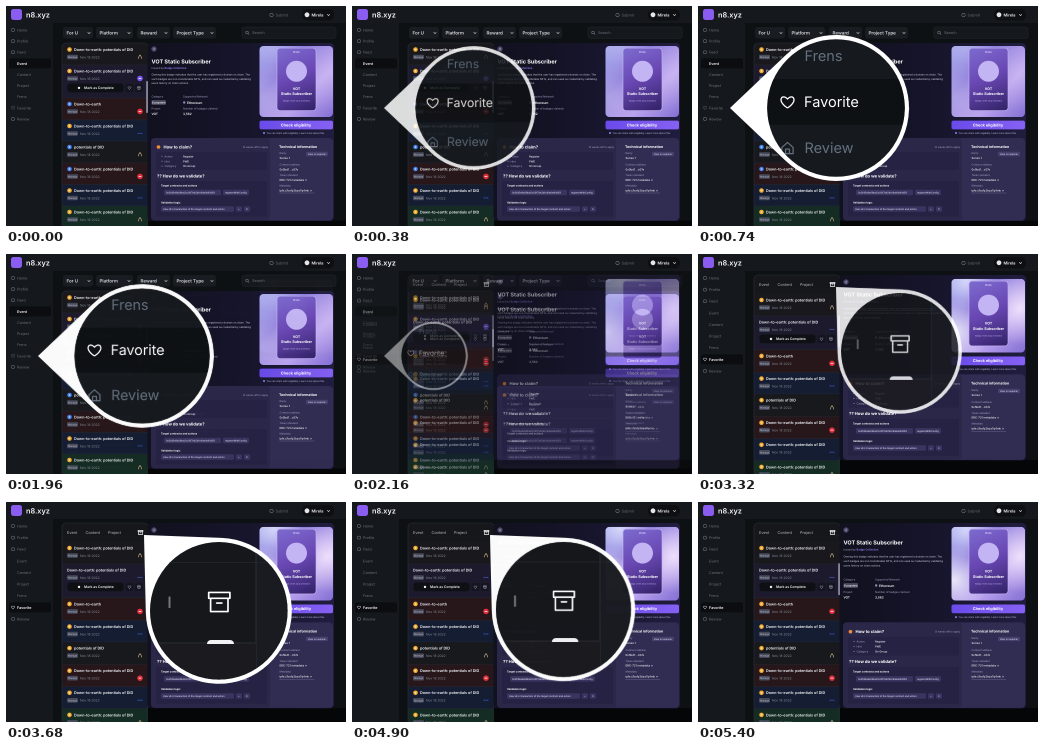
Write an HTML page with a canvas that moves like this. It is 340 by 220 pixels and loops after 6.48 s.

```html
<!DOCTYPE html>
<html lang="en">
<head>
<meta charset="utf-8">
<title>Favorites walkthrough</title>
<style>
  html, body { margin: 0; width: 100%; height: 100%; overflow: hidden; background: #0e1114; }
  canvas { display: block; width: 340px; height: 220px; }
</style>
</head>
<body>
<canvas id="stage"></canvas>
<script>
const W = 340, H = 220, LOOP = 6480;
const dpr = window.devicePixelRatio || 1;
const FONT = 'Inter, "Open Sans", sans-serif';
const GREY = '#6c727b', WHITE = '#f4f4f8', LILAC = '#aaa6c6';
let g;

function layer(canvas, scale, paint) {
  canvas.width = W * scale;
  canvas.height = H * scale;
  g = canvas.getContext('2d');
  g.scale(scale, scale);
  g.textRendering = 'geometricPrecision';
  if (paint) paint();
  return canvas;
}

function box(x, y, w, h, r, fill, stroke) {
  g.beginPath();
  g.roundRect(x, y, w, h, r);
  if (fill) { g.fillStyle = fill; g.fill(); }
  if (stroke) { g.strokeStyle = stroke; g.lineWidth = 0.6; g.stroke(); }
}

function dot(x, y, r, fill, stroke) {
  g.beginPath();
  g.arc(x, y, r, 0, Math.PI * 2);
  if (fill) { g.fillStyle = fill; g.fill(); }
  if (stroke) { g.strokeStyle = stroke; g.lineWidth = 0.6; g.stroke(); }
}

function text(s, x, y, size, color = WHITE, weight = 400, align = 'left') {
  g.font = `${weight} ${size}px ${FONT}`;
  g.fillStyle = color;
  g.textAlign = align;
  g.textBaseline = 'middle';
  g.fillText(s, x, y + 0.3);
}

function line(points, color, width) {
  g.beginPath();
  points.forEach(([x, y]) => g.lineTo(x, y));
  g.strokeStyle = color;
  g.lineWidth = width;
  g.lineCap = g.lineJoin = 'round';
  g.stroke();
}

function caret(x, y, color) {
  line([[x - 1.2, y - 0.6], [x, y + 0.6], [x + 1.2, y - 0.6]], color, 0.6);
}

function stops(gradient, colors) {
  colors.forEach((c, i) => gradient.addColorStop(i / (colors.length - 1), c));
  return gradient;
}

const shade = (x0, y0, x1, y1, ...colors) => stops(g.createLinearGradient(x0, y0, x1, y1), colors);
const glow = (x, y, r, ...colors) => stops(g.createRadialGradient(x, y, 0, x, y, r), colors);

function heart(x, y, s, color, width) {
  g.beginPath();
  g.moveTo(x, y + s);
  g.bezierCurveTo(x - s * 1.9, y - s * 0.2, x - s * 0.9, y - s * 1.5, x, y - s * 0.5);
  g.bezierCurveTo(x + s * 0.9, y - s * 1.5, x + s * 1.9, y - s * 0.2, x, y + s);
  g.strokeStyle = color;
  g.lineWidth = width;
  g.lineJoin = 'round';
  g.stroke();
}

function archive(x, y, s, color, width) {
  g.strokeStyle = color;
  g.lineWidth = width;
  g.lineJoin = 'round';
  g.strokeRect(x - s, y - s * 0.9, s * 2, s * 0.55);
  line([[x - s * 0.82, y - s * 0.35], [x - s * 0.82, y + s * 0.9],
        [x + s * 0.82, y + s * 0.9], [x + s * 0.82, y - s * 0.35]], color, width);
  line([[x - s * 0.25, y + s * 0.1], [x + s * 0.25, y + s * 0.1]], color, width);
}

function house(x, y, s, color, width) {
  line([[x - s, y - s * 0.1], [x, y - s], [x + s, y - s * 0.1], [x + s, y + s],
        [x - s, y + s], [x - s, y - s * 0.1]], color, width);
  line([[x - s * 0.35, y + s], [x - s * 0.35, y + s * 0.2],
        [x + s * 0.35, y + s * 0.2], [x + s * 0.35, y + s]], color, width);
}

function frame(active, k) {
  box(0, 0, W, H, 0, '#0e1114');
  box(0, 0, W, 17, 0, '#15181c');
  box(0, 0, 47, H, 0, '#15181c');
  box(5, 3, 11, 11, 2.5, '#8a5cf0');
  text('n8.xyz', 20, 8.8, 7.3, WHITE, 600);
  dot(265.5, 9, 1.7, null, GREY);
  text('Submit', 269.5, 9, 3.8, GREY);
  box(296, 3, 32, 11.5, 5.7, '#0d0f12');
  dot(301, 8.8, 2.4, '#e4e6ea');
  text('Mirela', 305.5, 9, 4, WHITE, 600);
  caret(322.5, 9, WHITE);

  ['Home', 'Profile', 'Feed', 'Event', 'Content', 'Project', 'Frens', 'Favorite', 'Review']
    .forEach((name, i) => {
      const y = 24 + i * 11.12 * k, on = name === active;
      if (on) box(3, y - 5, 42, 10, 2, '#0b0d10');
      const color = on ? WHITE : GREY;
      if (name === 'Favorite') heart(7, y, 1.5, color, 0.5);
      else if (i < 3 || i > 6) box(5.6, y - 1.4, 2.8, 2.8, 0.8, null, color);
      text(name, 11, y, 3.7, color, on ? 600 : 400);
    });
}

function filters() {
  [['For U', 57, 30], ['Platform', 90, 37], ['Reward', 131, 33], ['Project Type', 167, 43]]
    .forEach(([name, x, w]) => {
      box(x, 21, w, 11.5, 2.5, '#191c21');
      text(name, x + 3.5, 26.8, 4.5, '#dcdee3', 600);
      caret(x + w - 4, 27, '#dcdee3');
    });
  box(236, 21, 94, 11.5, 2.5, '#15181c', '#22262c');
  dot(241, 26.5, 1.3, null, GREY);
  line([[242, 27.5], [243, 28.5]], GREY, 0.6);
  text('Search', 246, 26.8, 3.8, GREY);
}

const LONG = 'Down-to-earth: potentials of DID';
const ROWS = [
  [43.5, LONG, '#19191d', '#f0a92c', 'flame'],
  [65, LONG, '#1c1a2c', '#f0a92c', '#7657f2'],
  [98, 'Down-to-earth', '#27171a', '#3f7ff0', '#e02f3c'],
  [120, LONG, '#141d32', '#f0a92c', 'more'],
  [141, 'potentials of DID', '#17191d', '#3f7ff0', 'flame'],
  [163, LONG, '#27171a', '#3f7ff0', '#e02f3c'],
  [184.5, LONG, '#141d32', '#f0a92c', 'more'],
  [206, LONG, '#142c23', '#f0a92c', 'flame']
];

function badge(kind, x, y) {
  if (kind === 'flame') {
    line([[x - 1.6, y + 1.6], [x - 1, y - 0.6], [x, y - 2], [x + 1.2, y - 0.2],
          [x + 1.6, y + 1.6]], '#c0a27e', 0.7);
  } else if (kind === 'more') {
    for (let i = -1; i < 2; i++) dot(x + i * 1.8, y, 0.55, '#4b6cf0');
  } else {
    dot(x, y, 2.8, kind);
    line([[x - 1.1, y], [x + 1.1, y]], '#fff', 0.7);
  }
}

function list(top, first, k, tabs) {
  const at = y => first + (y - 43.5) * k;
  g.save();
  g.beginPath();
  g.roundRect(56, top, 86, H - top + 10, 4);
  g.clip();
  box(56, top, 86, H, 0, '#15171b');
  if (tabs) {
    text('Event', 61, 30.3, 3.9, '#b4b7be');
    text('Content', 79.5, 30.3, 3.9, '#b4b7be');
    text('Project', 102, 30.3, 3.9, '#b4b7be');
    archive(134.5, 30.5, 2.4, WHITE, 0.7);
  }
  ROWS.forEach(([y0, title, fill, coin, mark], i) => {
    const y = at(y0), open = i === 1;
    const start = at(y0 - (i ? 5.8 : 6.5)), end = at(i < 7 ? ROWS[i + 1][0] - 5.8 : 230);
    box(56, start, 86, end - start, 0, fill);
    box(56, end - 0.4, 86, 0.6, 0, '#292c36');
    const plain = open && tabs;
    if (!plain) {
      dot(63.5, y, 2.3, tabs ? '#f0a92c' : coin);
      dot(63.5, y, 0.9, '#ffffffaa');
    }
    text(title, plain ? 61 : 68, y, 3.75, WHITE, 600);
    box(61, y + 5.2, 11, 4.6, 1.2, '#474b5c');
    text('Manage', 62, y + 7.5, 2.4, '#c2c5d0');
    text('Nov 18 2022', 74, y + 7.5, 3.3, '#878c97');
    badge(plain ? 'more' : mark, 134, y + 7.4);
    if (open) {
      box(61.5, y + 12.6, 56, 8.6, 2.5, '#0e1014');
      dot(73, y + 16.9, 1.2, WHITE);
      text('Mark as Complete', 78, y + 16.8, 3.4, WHITE, 600);
      box(119.5, y + 12.9, 8, 8, 2, '#14151f');
      heart(123.5, y + 17, 1.4, '#a9a6bd', 0.5);
      box(129, y + 12.9, 8, 8, 2, '#14151f');
      archive(133, y + 17, 1.4, '#a9a6bd', 0.5);
    }
  });
  g.restore();
  g.beginPath();
  g.roundRect(56, top, 86, H - top + 10, 4);
  g.strokeStyle = '#2b2f3c';
  g.lineWidth = 0.6;
  g.stroke();
}

function poster(top, h, shine) {
  g.save();
  g.beginPath();
  g.roundRect(253.5, top, 73.5, h, 4);
  g.clip();
  box(253, top, 74, h, 0, shade(253, top, 327, top + h, '#a5a8ec', '#8f7fdc', '#b9a2ee', '#8470d4'));
  g.globalAlpha = shine;
  box(253, top, 74, h, 0, glow(256, top + h * 0.72, 34, '#ffffff', '#ffffff00'));
  box(253, top, 74, h, 0, glow(322, top + h * 0.4, 36, '#fbeeff', '#fbeeff00'));
  box(253, top, 74, h, 0, glow(268, top + 2, 28, '#e2e6ff', '#e2e6ff00'));
  g.restore();

  const y = top + h * 0.03, ch = h * 0.88;
  box(271, y, 39, ch, 3, shade(271, y, 300, y + ch, '#7d6cd0', '#6a48b4', '#37266f'), '#c6b7f4');
  text('PIXEL', 290.5, y + 4, 2.6, '#e8e0ff', 500, 'center');
  dot(290.5, y + ch * 0.37, 10.5, '#c3b5f3');
  text('VOT', 290.5, y + ch * 0.65, 3.5, '#fff', 700, 'center');
  text('Static Subscriber', 290.5, y + ch * 0.73, 3.7, '#fff', 700, 'center');
  text('Badge of the early members', 290.5, y + ch * 0.84, 2, '#cfc3f2', 400, 'center');
}

function detail(top, base, k, shine) {
  const at = y => base + (y - 43) * k;
  const low = at(132), bottom = at(214.5);
  box(142, bottom, W - 142, H - bottom, 0, '#050607');
  box(141.5, top, 186.5, bottom - top + 0.5, 4, shade(142, 0, 328, 0, '#11111f', '#16152b', '#211d40'));

  dot(148, at(43), 2.7, '#4a4668');
  line([[148.6, at(43) - 1], [147.5, at(43)], [148.6, at(43) + 1]], WHITE, 0.5);
  text('VOT Static Subscriber', 145.5, at(55.3), 5.5, '#fff', 700);
  text('Issued by', 145.5, at(61.7), 2.7, LILAC);
  text('Badge Collective', 158.5, at(61.7), 2.7, '#8f83f0', 600);
  ['Owning this badge indicates that the user has registered a domain on chain. The',
   'such badges are non-transferable NFTs, and can used as credential by validating',
   'users history on chain actions.'
  ].forEach((s, i) => text(s, 145.5, at(68.5 + i * 4.3), 2.6, '#dad8e8'));

  text('Category', 145.5, at(90.5), 2.7, LILAC);
  text('Supported Network', 177, at(90.5), 2.7, LILAC);
  box(145.5, at(96.5) - 2.4, 14.5, 4.8, 1, '#4b4a5e');
  text('Ecosystem', 152.7, at(96.5), 2.5, '#fff', 600, 'center');
  dot(178.2, at(96.5), 1.2, '#8d8bb2');
  text('Ethereum', 181, at(96.5), 3.3, WHITE, 600);
  text('Project', 145.5, at(102.5), 2.7, LILAC);
  text('Number of badges claimed', 177, at(102.5), 2.7, LILAC);
  text('VOT', 145.5, at(108), 3.1, WHITE, 600);
  text('3,562', 177, at(108), 3.1, WHITE, 600);

  poster(at(40), 71 * k, shine);
  box(253.5, at(119) - 4.4, 73.5, 8.8, 2, shade(253, 0, 327, 0, '#6a4bea', '#8661f4'));
  text('Check eligibility', 290, at(118.8), 3.9, '#fff', 700, 'center');
  dot(258, at(127), 1, '#8f83f0');
  text('You can claim with eligibility. Learn more about this', 260.5, at(127), 2.4, '#c5c2da');

  box(145, low, 182, bottom - low, 4, '#312c52');
  box(145, low, 119, bottom - low, 4, '#2b2749');

  dot(152.5, at(141), 1.8, '#f08a3c');
  text('How to claim?', 157.5, at(140.7), 4.2, '#fff', 700);
  text('13 weeks left to apply', 262, at(141), 2.5, LILAC, 400, 'right');
  box(150, at(146), 111, at(164) - at(146), 2, '#262243');
  [['Action', 'Register'], ['Hint', 'PWE'], ['Category', 'On Group']].forEach(([a, b], i) => {
    const y = at(150.3 + i * 4.9);
    dot(156, y, 0.5, LILAC);
    text(a, 158.5, y, 2.7, LILAC);
    text(b, 177, y, 2.7, WHITE, 500);
  });

  text('?? How do we validate?', 151, at(169.7), 4.2, '#fff', 700);
  box(150, at(175), 111, at(210.5) - at(175), 2, '#262243');
  text('Target contracts and actions', 155, at(179.3), 2.6, '#fff', 700);
  const code = (s, x, w, y) => {
    box(x, at(y) - 2.7, w, 5.4, 1.2, '#3a3560');
    text(s, x + 2, at(y), 2.4, '#e6e3f5', 500);
  };
  code('0x2fd5e8a09bd2c00f7a42b1c8de9a61d59', 158, 57, 186.5);
  code('registerWithConfig', 217, 26, 186.5);
  text('Validation logic', 155, at(196.3), 2.6, '#fff', 700);
  code('User.id in transaction of the target contract and action', 155, 73, 203);
  code('=', 230, 6, 203);
  code('0', 238, 6, 203);

  text('Technical information', 273, at(140.7), 3.6, '#fff', 700);
  const fact = (label, value, y) => {
    text(label, 273.5, at(y), 2.5, LILAC);
    text(value, 273.5, at(y + 4.7), 2.8, WHITE, 500);
  };
  fact('Rarity', 'Series 1', 147);
  box(300, at(148) - 2.2, 22, 4.4, 1, '#45406e');
  text('View on explorer', 311, at(148), 2.3, WHITE, 400, 'center');
  fact('Contract address', '0x5bd1...c07e', 158.5);
  fact('Token standard', 'ERC-721 metadata \u2197', 169);
  fact('Metadata', 'ipfs://bafy2bza7q4mk \u2197', 179.5);
  line([[273.5, at(187)], [308, at(187)]], '#8d88b0', 0.3);

  box(140.3, at(75), 1.5, 32, 0.7, '#a3a0b8');
}

const bubbles = [
  {
    tip: [32, 102], mid: [138, 102], r: 73, start: -30, leave: 1938,
    art() {
      box(60, 25, 155, 155, 0, '#161a1e');
      box(60, 73, 155, 46, 0, '#0e1114');
      text('Frens', 106.5, 50.3, 14.5, '#66717f');
      heart(89.5, 96, 6, '#fff', 1.3);
      text('Favorite', 106, 96.3, 14.5, '#fff');
      house(89.5, 142, 5.6, '#66717f', 1.2);
      text('Review', 106.5, 142.3, 14.5, '#66717f');
    }
  },
  {
    tip: [138, 33], mid: [212.8, 108.8], r: 73, start: 2905, leave: 4878,
    art() {
      box(138, 33, 150, 150, 0, '#15171b');
      box(250, 33, 40, 150, 0, '#191b20');
      line([[138, 60.5], [290, 60.5]], '#202329', 1);
      line([[250, 33], [250, 183]], '#2a2d33', 1);
      box(138, 141, 112, 42, 0, '#1b1a1e');
      line([[138, 141], [250, 141]], '#2a2d33', 1);
      box(162.5, 94.5, 2, 11.5, 0.5, '#72767e');
      archive(213.3, 100, 10.6, '#fff', 1.7);
      box(201, 138, 27, 4, [4, 4, 0, 0], '#f2f2f4');
    }
  }
];

function paintBubble({ tip, mid, r, art }) {
  const [cx, cy] = mid;
  const dx = tip[0] - cx, dy = tip[1] - cy;
  const aim = Math.atan2(dy, dx), spread = Math.acos(r / Math.hypot(dx, dy));
  g.beginPath();
  g.arc(cx, cy, r, aim + spread, aim - spread + Math.PI * 2);
  g.lineTo(...tip);
  g.closePath();
  g.fillStyle = '#fff';
  g.fill();
  g.beginPath();
  g.arc(cx, cy, r - 4.2, 0, Math.PI * 2);
  g.clip();
  art();
}

// Layers are painted at double size so that tiny text scales down softly
const make = paint => layer(document.createElement('canvas'), dpr * 2, paint);
const eventScreen = make(() => {
  frame('Event', 1);
  filters();
  list(37, 43.5, 1, false);
  detail(37, 43, 1, 0.25);
});
const favoriteScreen = make(() => {
  frame('Favorite', 1.045);
  list(21, 46, 1.027, true);
  detail(21, 28, 1.0375, 0.8);
});
bubbles.forEach(b => { b.image = make(() => paintBubble(b)); });

// cubic-bezier(.25, .1, .25, 1), solved by bisection
function ease(x) {
  if (x <= 0) return 0;
  if (x >= 1) return 1;
  const curve = (u, a, b) => 3 * (1 - u) * (1 - u) * u * a + 3 * (1 - u) * u * u * b + u * u * u;
  let lo = 0, hi = 1;
  for (let i = 0; i < 24; i++) {
    const u = (lo + hi) / 2;
    if (curve(u, 0.25, 0.25) < x) lo = u; else hi = u;
  }
  return curve(lo, 0.1, 1);
}

const ENTER = 750, EXIT = 720;
const stage = layer(document.getElementById('stage'), dpr);
const ctx = stage.getContext('2d');
ctx.imageSmoothingQuality = 'high';

function show(image, alpha) {
  ctx.globalAlpha = alpha;
  ctx.drawImage(image, 0, 0, W, H);
}

function draw(t) {
  const swap = ease((t - bubbles[0].leave) / EXIT);
  show(eventScreen, 1);
  if (swap > 0) show(favoriteScreen, swap);
  for (const { tip, start, leave, image } of bubbles) {
    const p = ease((t - start) / ENTER) - ease((t - leave) / EXIT);
    if (p < 0.004) continue;
    ctx.save();
    ctx.translate(...tip);
    ctx.scale(p, p);
    ctx.translate(-tip[0], -tip[1]);
    show(image, p);
    ctx.restore();
  }
}

const began = performance.now();
function tick() {
  draw((performance.now() - began) % LOOP);
  requestAnimationFrame(tick);
}
tick();
</script>
</body>
</html>
```
